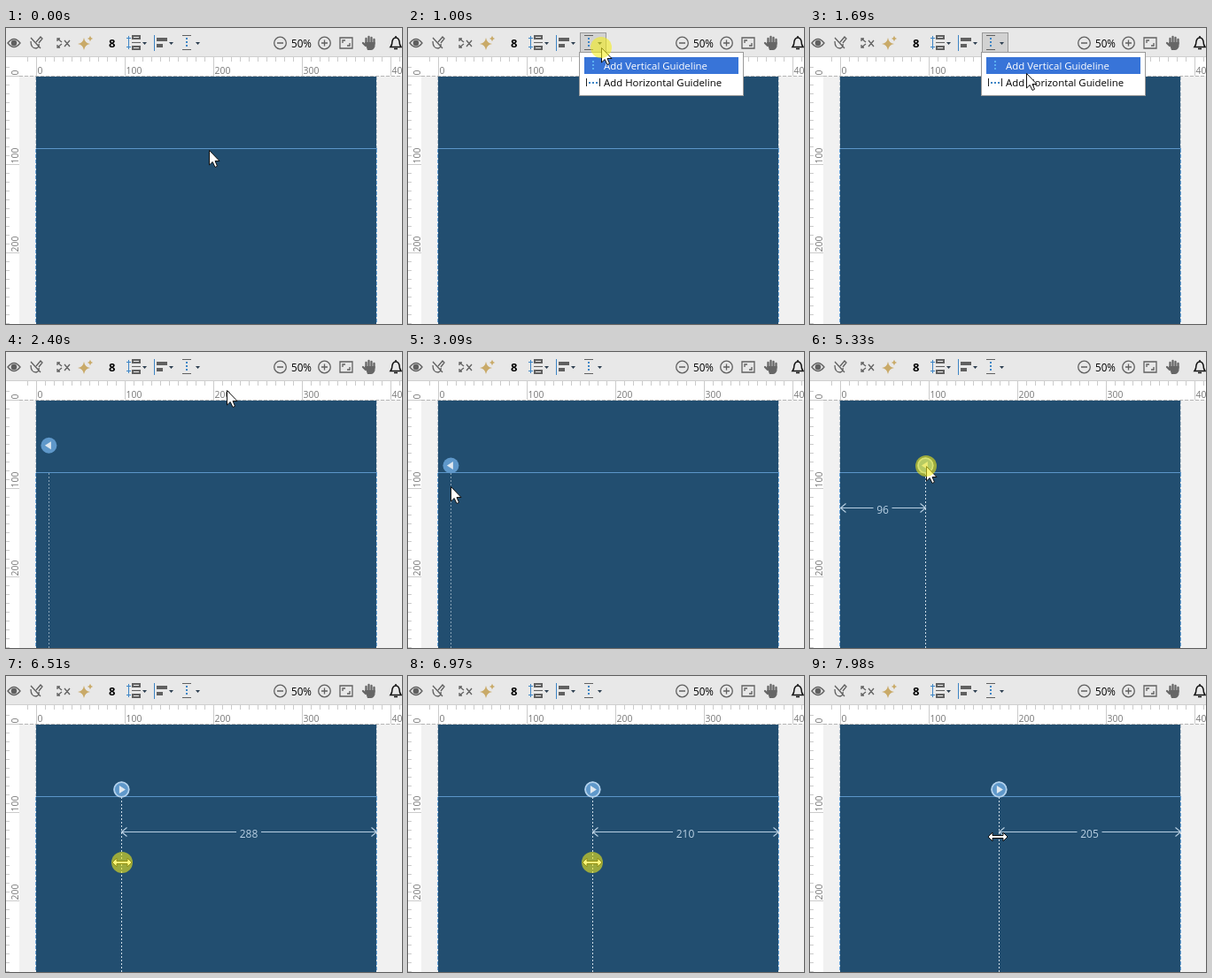
Write an HTML page that moves like this. It is 447x335 px and loops after 8000 ms.

```html
<!DOCTYPE html>
<html lang="en">
<head>
<meta charset="utf-8">
<title>Guideline editor</title>
<style>
  html, body { margin: 0; width: 100%; height: 100%; overflow: hidden; background: #f1f1f1; }
  svg { display: block; width: 447px; height: 335px; font-family: "Open Sans", "Noto Sans", sans-serif; }
  .crisp { shape-rendering: crispEdges; }
  .line { fill: none; stroke: #606060; stroke-width: 1.3; }
  .blue { fill: none; stroke: #3d85c6; }
  #rulers text { font-size: 10.4px; fill: #777; }
  #menu text { font-size: 11.4px; }
</style>
</head>
<body>
<svg viewBox="0 0 447 335">
  <defs>
    <path id="caret" d="M0 0H5L2.5 3Z" fill="#2c3e50"/>
    <path id="star" d="M0 -7Q1 -1 7 0Q1 1 0 7Q-1 1 -7 0Q-1 -1 0 -7Z" fill="#c9aa68"/>
    <circle id="lens" class="line" r="6.8"/>
  </defs>
  <rect width="447" height="335" fill="#f1f1f1"/>

  <g class="crisp">
    <rect y="33" width="447" height="21" fill="#fff"/>
    <rect y="33" width="15" height="302" fill="#fff"/>
    <rect x="34" y="55" width="384" height="280" fill="#224e70"/>
    <g stroke-dasharray="4 2">
      <path d="M15 54.5H447" stroke="#b5b5b5"/>
      <path d="M33.5 55V136M418.5 55V136" stroke="#b9c6d1"/>
      <path d="M33.5 137V335M418.5 137V335" stroke="#6fa8dc"/>
    </g>
    <path d="M34 136.5H419" stroke="#5b95c9"/>
  </g>
  <g id="rulers">
    <path id="ticks" class="crisp" stroke="#cbcbcb" fill="none"/>
  </g>

  <rect width="447" height="32" fill="#e8e8e8"/>
  <rect y="32" width="447" height="1" fill="#cfcfcf"/>
  <rect id="button" class="crisp" x="194.5" y="5.5" width="29" height="23" fill="#d2d2d2" stroke="#999"/>

  <g id="toolbar">
    <path class="line" d="M2 17Q9 8 16 17Q9 26 2 17Z"/>
    <circle cx="9" cy="17" r="3.3" fill="#606060"/>
    <path class="line" d="M28 11L39 23M28 15Q28 23 34 23Q38 22 37 18M34 16L39 10L41 12L37 17"/>
    <path class="line" d="M58 15V12H61M58 12L63 16M58 19V22H61M58 22L63 18M66 14L72 21M72 14L66 21"/>
    <use href="#star" x="88" y="18"/>
    <use href="#star" transform="translate(95 12) scale(.45)"/>
    <text x="116" y="22" font-size="13" font-weight="700">8</text>
    <g class="crisp">
      <path class="line" stroke-width="1" d="M143 9H151V12H143ZM143 21H151V24H143ZM142 16.5H152"/>
      <path class="blue" d="M138.5 9V24M136 11.5H141M136 21.5H141"/>
      <path class="blue" d="M167.5 8V26"/>
      <path d="M170 11H182V15H170ZM170 18H177V22H170Z" fill="#606060"/>
      <path class="line" stroke-width="1" d="M199 8.5H209M199 24.5H209"/>
      <path class="blue" d="M204 11V23" stroke-width="2" stroke-dasharray="2 2"/>
    </g>
    <use href="#caret" x="154" y="16"/>
    <use href="#caret" x="184" y="16"/>
    <use href="#caret" x="214" y="16"/>
    <use href="#lens" x="309.5" y="17"/>
    <use href="#lens" x="359.5" y="17"/>
    <path class="line" d="M306 17H313M356 17H363M359.5 13.5V20.5"/>
    <text x="322" y="22" font-size="11.7">50%</text>
    <path class="line" d="M377 11H391V23H377ZM380 17V14H383M388 17V20H385"/>
    <path d="M403 17L406 20M406.5 18V12M409.5 17V10M412.5 17V11M415.5 18V13" stroke="#666" stroke-width="2.3" stroke-linecap="round"/>
    <path d="M405 16H416.5V21Q415 25 412 25H408Z" fill="#666"/>
    <path d="M434 21.5Q436 19 436 15Q437 11 440 11Q443 11 444 15Q444 19 446 21.5ZM438 23.5H442M440 9V11" fill="none" stroke="#111" stroke-width="1.5"/>
  </g>

  <g id="guide">
    <path id="dashes" class="crisp" d="M.5 137V335" stroke="#dfe9f2" stroke-dasharray="2 2"/>
    <g id="badge">
      <circle r="9" fill="#5f98ca"/>
      <circle id="ring" r="8.3" fill="none" stroke="#b4d2ec" stroke-width="1.7"/>
      <path id="pointer" d="M-4.5 0L2.5 -4.5V4.5Z" fill="#e0e8ef"/>
    </g>
  </g>
  <g id="measure">
    <path id="arrows" fill="none" stroke="#b9d0e3" stroke-width="1.1"/>
    <text id="distance" y="183" font-size="12" text-anchor="middle" fill="#b9d0e3"></text>
  </g>

  <g id="menu">
    <rect class="crisp" x="193.5" y="27.5" width="185" height="49" fill="#fff" stroke="#999"/>
    <rect id="highlight" class="crisp" x="199" width="174" height="19" fill="#3874d8"/>
    <g class="crisp" stroke-width="2" stroke-dasharray="2 2">
      <path d="M209 37V49" stroke="#5bb0f0"/>
      <path class="blue" d="M204 62H215"/>
    </g>
    <path class="crisp" d="M201.5 57V66M216.5 57V66" stroke="#222"/>
    <text id="vertical" x="221" y="47">Add Vertical Guideline</text>
    <text id="horizontal" x="221" y="66">Add Horizontal Guideline</text>
  </g>

  <g id="cursor">
    <path id="arrow" d="M.5 .5V17L4.2 13.5L7 19.5L9.5 18.3L7 12.5H12Z" fill="#fff" stroke="#111"/>
    <path id="resize" d="M-11 0L-6 -5V-1.5H6V-5L11 0L6 5V1.5H-6V5Z" fill="#fff" stroke="#111"/>
    <circle id="click" r="12" fill="#f4ee18" fill-opacity=".58"/>
  </g>
</svg>
<script>
const LOOP = 8000, LEFT = 34, RIGHT = 418;
const MENU_OPEN = 930, CREATED = 2000, FLIPPED = 5580;
const firstDrag = [3410, 3740], secondDrag = [6510, 7050];

// Each move: time span and destination
const moves = [
  [[70, 850], 218, 22],
  [[1310, 1540], 232, 74],
  [[1540, 1770], 249, 43],
  [[2700, 3090], 48, 152],
  [firstDrag, 130, 180],
  [[4250, 4480], 131, 184],
  [[4710, 5150], 131, 129],
  [[FLIPPED, 6190], 131, 211],
  [secondDrag, 213, 211],
  [[7900, 7980], 212, 182]
];
const presses = [MENU_OPEN, CREATED, 5300].map(t => [t, t + 150]).concat([firstDrag, secondDrag]);

const $ = id => document.getElementById(id);
const set = (id, attrs) => {
  for (const name in attrs) $(id).setAttribute(name, attrs[name]);
};
const show = (id, on) => set(id, { opacity: on ? 1 : 0 });
const within = (t, [from, to]) => t >= from && t < to;
const progress = (t, [from, to]) => Math.min(1, Math.max(0, (t - from) / (to - from)));
const ease = p => p * p * (3 - 2 * p);

function cursorAt(t) {
  let x = 229, y = 138;
  for (const [span, toX, toY] of moves) {
    const p = ease(progress(t, span));
    x += (toX - x) * p;
    y += (toY - y) * p;
  }
  return [Math.round(x), Math.round(y)];
}

function guideAt(t) {
  return Math.round(48 + 82 * ease(progress(t, firstDrag)) + 83 * ease(progress(t, secondDrag)));
}

function buildRulers() {
  let d = '';
  const label = (value, place) => {
    const text = document.createElementNS('http://www.w3.org/2000/svg', 'text');
    text.textContent = value;
    text.setAttribute('transform', place);
    $('rulers').append(text);
  };
  for (let v = -10; v <= 410; v += 10) {
    const major = v % 100 === 0, x = LEFT + v + .5, y = 54.5 + v;
    d += `M${x} 33V${major ? 54 : 38}M0 ${y}H${major ? 15 : 4}`;
    if (!major) continue;
    label(v, `translate(${x + 1} 52)`);
    label(v, `translate(14 ${y - 1}) rotate(-90)`);
  }
  set('ticks', { d });
}

function drawMeasure(from, to) {
  const value = String(to - from), mid = (from + to) / 2, gap = 3.5 * (value.length + 1);
  const a = from + .5, b = to + .5, y = 176.5;
  const shaft = (start, end) => start < end ? `M${start} ${y}H${end}` : '';
  const head = (tip, dx) => `M${tip + dx} ${y - 5}L${tip} ${y}L${tip + dx} ${y + 5}`;
  set('arrows', { d: shaft(a, mid - gap) + shaft(mid + gap, b) + head(a, 6) + head(b, -6) });
  set('distance', { x: mid });
  $('distance').textContent = value;
}

function render(t) {
  const [x, y] = cursorAt(t), guide = guideAt(t);
  const selected = t >= firstDrag[0], flipped = t >= FLIPPED;

  const resizing = within(t, firstDrag) || selected && y > 180;
  set('cursor', { transform: `translate(${x} ${y})` });
  show('arrow', !resizing);
  show('resize', resizing);
  show('click', presses.some(span => within(t, span)));

  const lower = y >= 53;
  show('button', t < CREATED && (t >= MENU_OPEN || y < 30));
  show('menu', within(t, [MENU_OPEN, CREATED]));
  set('highlight', { y: lower ? 52 : 33 });
  set('vertical', { fill: lower ? '#000' : '#fff' });
  set('horizontal', { fill: lower ? '#fff' : '#000' });

  // The badge drops in from above while shrinking to size
  const drop = progress(t, [CREATED, CREATED + 550]), settle = Math.min(1, drop / .6);
  show('guide', t >= CREATED);
  set('guide', { transform: `translate(${guide} 0)` });
  set('dashes', { 'stroke-opacity': selected ? .9 : .55 });
  set('badge', {
    transform: `translate(.4 ${44.5 + 84 * drop}) scale(${2.3 - 1.3 * settle})`,
    opacity: settle
  });
  set('pointer', { transform: flipped ? 'scale(-1 1)' : '' });
  show('ring', selected);
  show('measure', selected);
  if (flipped) drawMeasure(guide, RIGHT);
  else drawMeasure(LEFT, guide);
}

buildRulers();
const start = performance.now();
function tick() {
  render((performance.now() - start) % LOOP);
  requestAnimationFrame(tick);
}
tick();
</script>
</body>
</html>
```
